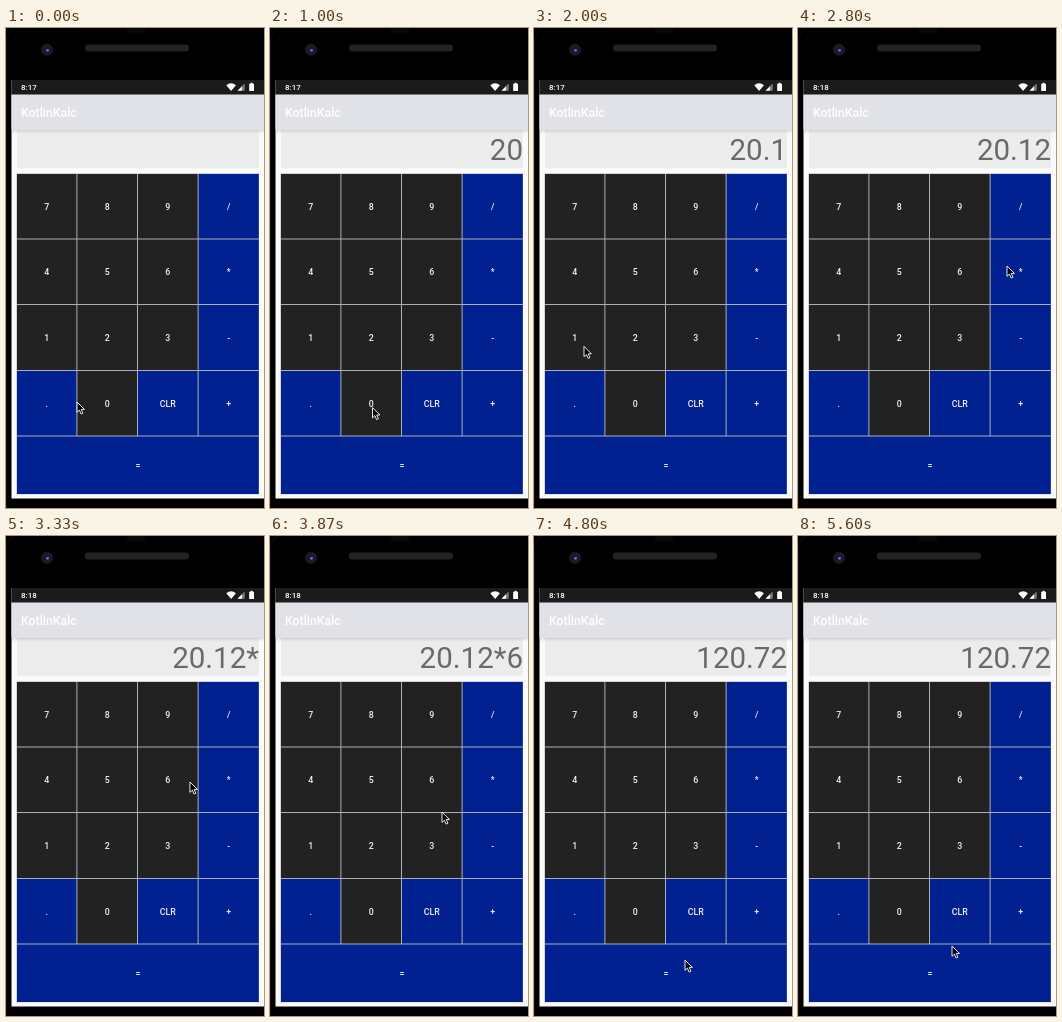
Write an HTML page that moves like this. It is 258 by 480 pixels and loops after 5670 ms.

```html
<!DOCTYPE html>
<html lang="en">
<head>
<meta charset="utf-8">
<title>Calculator</title>
<style>
html, body { margin: 0; width: 100%; height: 100%; overflow: hidden; background: #000; }
svg { display: block; width: 258px; height: 480px; font-family: Roboto, sans-serif; }
.key { font-size: 8.8px; font-weight: 500; fill: #f4f4f4; text-anchor: middle; }
</style>
</head>
<body>
<svg viewBox="0 0 258 480">
  <defs>
    <linearGradient id="shade" x2="0" y2="1">
      <stop stop-color="#000" stop-opacity=".12"/>
      <stop offset="1" stop-color="#000" stop-opacity="0"/>
    </linearGradient>
  </defs>
  <rect width="258" height="480"/>
  <path d="M.5 480V12Q.5 4 8 .5" fill="none" stroke="#101010"/>
  <rect x="121" y="-4" width="18" height="9" rx="3" fill="#08090c"/>
  <circle cx="41" cy="21.8" r="6" fill="#1b1b21"/>
  <circle cx="41" cy="21.8" r="3.2" fill="#14183a"/>
  <circle cx="41.6" cy="22.3" r="1.4" fill="#6a74c4"/>
  <rect x="79" y="16.6" width="104" height="7" rx="3" fill="#222225"/>

  <rect x="5.5" y="52" width="253" height="418.5" fill="#fafafa"/>
  <rect x="5.5" y="52" width="253" height="15" fill="#1b1b1b"/>
  <text id="clock" x="15" y="62" font-size="8" font-weight="500" fill="#fff"></text>
  <g fill="#fff" transform="translate(-.4 -.5)">
    <path d="M220.7 57.7Q225.5 53.9 230.3 57.7L225.5 63.5Z"/>
    <path d="M232 63.3L239 56V63.3Z" fill-opacity=".45"/>
    <path d="M232 63.3L236.3 58.8V63.3Z"/>
    <path d="M243.6 56.3H245V55.3H247V56.3H248.4V63.4H243.6Z"/>
  </g>
  <rect x="11" y="102" width="242" height="38.2" fill="#ececec"/>
  <rect x="5.5" y="66.5" width="253" height="35.2" fill="#e1e2e7"/>
  <rect x="5.5" y="101.7" width="253" height="4" fill="url(#shade)"/>
  <text x="15" y="88.7" font-size="12.3" font-weight="500" fill="#fff">KotlinKalc</text>
  <text id="out" x="253" y="132.4" font-size="29.5" fill="#6a6a6a" text-anchor="end"></text>

  <rect x="10.5" y="145.5" width="242.5" height="320.8" fill="#acafbc"/>
  <g id="keys"></g>
  <path id="cursor" d="M0 0V10.3L2.4 8.1L4.1 12L5.9 11.2L4.2 7.4H7.4Z" fill="#000" stroke="#fff" stroke-width=".9" stroke-linejoin="round"/>
</svg>
<script>
const LOOP = 5670, STEP = 1000 / 15, PRESS = 200;
// left and top edges of the one pixel grid lines
const xs = [10, 70.4, 131, 191.6, 252.8];
const ys = [145, 210.5, 276, 342, 407.5, 466];
const rows = ["789/", "456*", "123-", [".", "0", "CLR", "+"], "="];

// time, x, y of the pointer tip
const path = [
  [0, 71, 374], [270, 101, 316], [400, 101, 318], [600, 102.5, 379.6], [1000, 102.5, 379.6],
  [1270, 45, 382], [1470, 45, 383], [1730, 50, 318.4], [2070, 50, 318.4], [2400, 100, 321],
  [2530, 100, 321], [2800, 209, 238], [3070, 209, 238], [3330, 184, 246], [3400, 176, 248],
  [3730, 176, 248], [4270, 151, 424], [5130, 151, 424], [5600, 154, 410], [LOOP, 154, 410]
];
const presses = [
  [300, "2"], [600, "0"], [1330, "."], [1800, "1"],
  [2400, "2"], [2930, "*"], [3450, "6"], [4430, "="]
];
const readout = [
  [0, ""], [400, "2"], [670, "20"], [1470, "20."], [1870, "20.1"],
  [2530, "20.12"], [3070, "20.12*"], [3530, "20.12*6"], [4530, "120.72"]
];
const times = [[0, "8:17"], [2600, "8:18"]];

const byId = id => document.getElementById(id);
const clock = byId("clock"), out = byId("out"), keys = byId("keys"), cursor = byId("cursor");
const glow = {};

function add(tag, attrs) {
  const node = document.createElementNS("http://www.w3.org/2000/svg", tag);
  for (const name in attrs) node.setAttribute(name, attrs[name]);
  return keys.appendChild(node);
}

rows.forEach((row, r) => [...row].forEach((label, c) => {
  const x = xs[c] + 1, right = row.length === 1 ? xs[4] : xs[c + 1];
  const y = ys[r] + 1, bottom = ys[r + 1];
  const box = { x, y, width: right - x, height: bottom - y };
  add("rect", { ...box, fill: /\d/.test(label) ? "#222" : "#00218f" });
  glow[label] = add("rect", { ...box, fill: "#fff", opacity: 0 });
  add("text", { class: "key", x: (x + right) / 2, y: (y + bottom) / 2 + 3.3 }).textContent = label;
}));

const valueAt = (list, t) => list.filter(item => item[0] <= t).pop()[1];

function pointAt(t) {
  const i = path.findIndex(p => p[0] > t);
  const [t0, x0, y0] = path[i - 1], [t1, x1, y1] = path[i];
  const u = (t - t0) / (t1 - t0), e = u * u * (3 - 2 * u);
  return [x0 + (x1 - x0) * e, y0 + (y1 - y0) * e];
}

function draw(t) {
  clock.textContent = valueAt(times, t);
  out.textContent = valueAt(readout, t);
  for (const label in glow) {
    const hit = presses.find(([at, key]) => key === label && t >= at && t < at + PRESS);
    glow[label].setAttribute("opacity", hit ? .14 * Math.sin(Math.PI * (.25 + .75 * (t - hit[0]) / PRESS)) : 0);
  }
  cursor.setAttribute("transform", `translate(${pointAt(t)})`);
}

const start = performance.now();
function tick(now) {
  const t = Math.max(0, now - start) % LOOP;
  draw(Math.min(LOOP - 1, Math.floor(t / STEP + .1) * STEP));
  requestAnimationFrame(tick);
}
tick(start);
</script>
</body>
</html>
```
